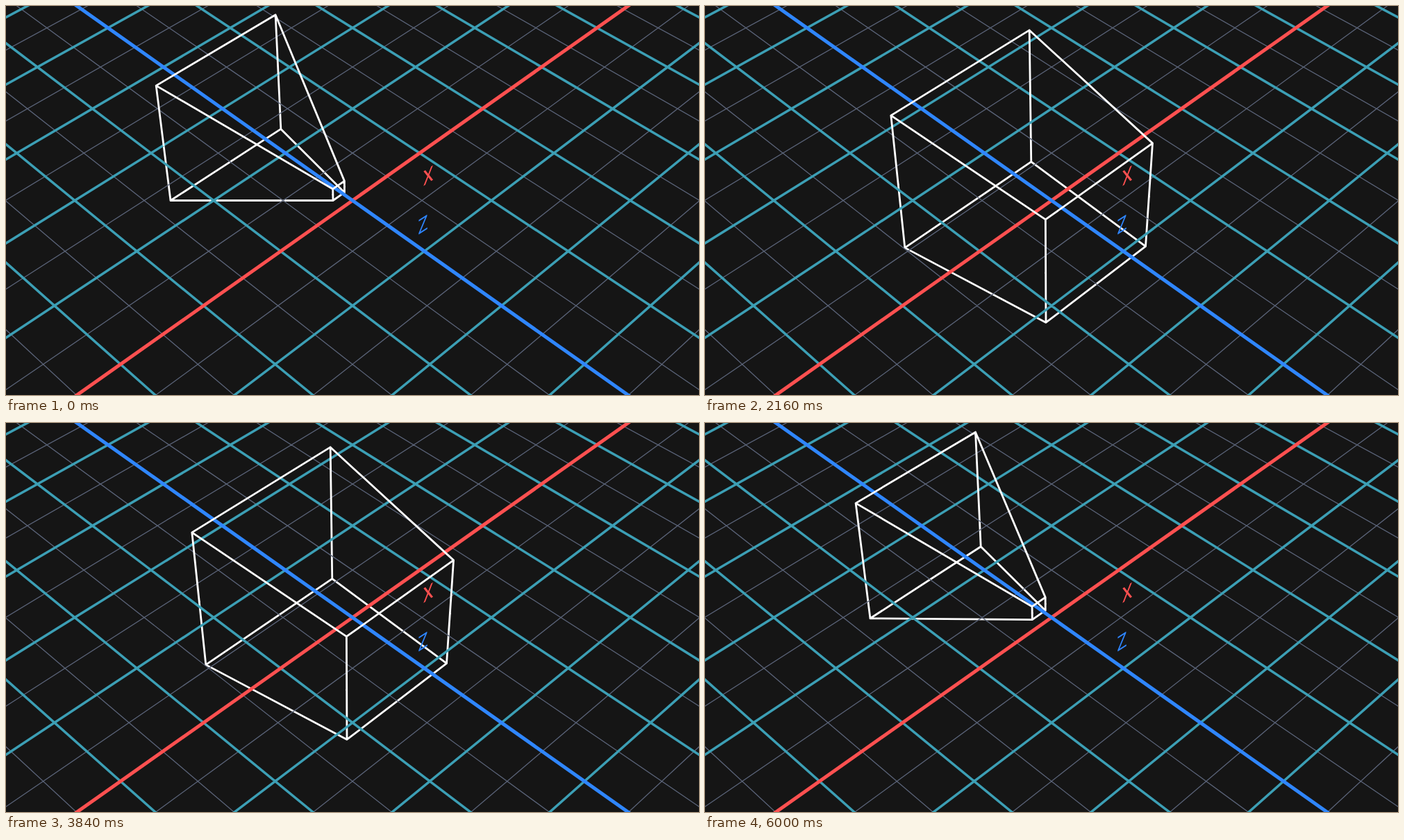
An HTML page that plays this animation: 998x561 px, repeating every 6.04 s.

```html
<!DOCTYPE html>
<html lang="en">
<head>
<meta charset="utf-8">
<title>Frustum to cube</title>
<style>
  html, body { margin: 0; width: 100%; height: 100%; overflow: hidden; background: #151515; }
  svg { display: block; width: 100%; height: 100%; }
  path { fill: none; stroke-linecap: round; stroke-linejoin: round; }
  text { font: 29.5px Roboto, Arial, sans-serif; text-anchor: middle; }
  .minor { stroke: #5a6378; stroke-width: 1.3; }
  .major { stroke: #3c9fb5; stroke-width: 3.5; }
  .axis { stroke-width: 5; }
  .edge { stroke: #fff; stroke-width: 2.8; }
</style>
</head>
<body>
<svg viewBox="0 0 998 561">
  <path id="below" class="edge"/>
  <path id="minor" class="minor"/>
  <path id="major" class="major"/>
  <path id="axisX" class="axis" stroke="#ff5050"/>
  <path id="axisZ" class="axis" stroke="#2f86ff"/>
  <text fill="#ff5050" transform="matrix(.82 -.53 0 1 608 244.5)" y="10.5">X</text>
  <text fill="#2f86ff" transform="matrix(.82 -.53 0 1 600.5 315)" y="10.5">Z</text>
  <path id="above" class="edge"/>
</svg>
<script>
const FRAME = 40, FRAMES = 151, HALF = 75;
const NEAR = 0.2, FAR = 2, SLOPE = Math.tan(Math.PI / 8);

const setPath = (id, d) => document.getElementById(id).setAttribute('d', d);
const mix = (a, b, p) => a + (b - a) * p;

// Camera pitched 45 degrees, looking at the origin midway between the X and Z axes.
function project([x, y, z]) {
  const depth = z - x;
  const w = 1 - 0.034 * depth - 0.048 * y;
  return [
    499 + 100 * (x + z) / w,
    280.5 + (70.7 * depth - 100 * y) / w
  ].map(n => n.toFixed(2)).join(' ');
}

const line = (...points) => 'M' + points.map(project).join('L');

function drawGrid() {
  const size = 10;
  let minor = '', major = '';
  for (let k = -2 * size; k <= 2 * size; k++) {
    const c = k / 2;
    const pair = line([c, 0, -size], [c, 0, size]) + line([-size, 0, c], [size, 0, c]);
    if (k % 2) minor += pair;
    else if (k) major += pair;
  }
  setPath('minor', minor);
  setPath('major', major);
  setPath('axisX', line([-size, 0, 0], [size, 0, 0]));
  setPath('axisZ', line([0, 0, -size], [0, 0, size]));
}

// Two horizontal rings plus the four uprights, cut where they cross the grid plane.
function halfBox(p, side) {
  const ring = [[NEAR, 1], [FAR, -1]].flatMap(([distance, cubeZ]) => {
    const r = mix(distance * SLOPE, 1, p);
    const z = mix(-distance, cubeZ, p);
    const corners = [[-r, side * r, z], [r, side * r, z]];
    return cubeZ > 0 ? corners : corners.reverse();
  });
  return line(...ring) + 'Z' + ring.map(c => line(c, [c[0], 0, c[2]])).join('');
}

function draw(time) {
  const i = Math.floor(time / FRAME) % FRAMES;
  // The way back ends one step early and the last step already opens again.
  const step = i < FRAMES - 2 ? HALF - Math.abs(HALF - i) : i - (FRAMES - 2);
  const p = step / HALF;
  setPath('below', halfBox(p, -1));
  setPath('above', halfBox(p, 1));
}

drawGrid();
const start = performance.now();
function tick() {
  draw(performance.now() - start);
  requestAnimationFrame(tick);
}
tick();
</script>
</body>
</html>
```
